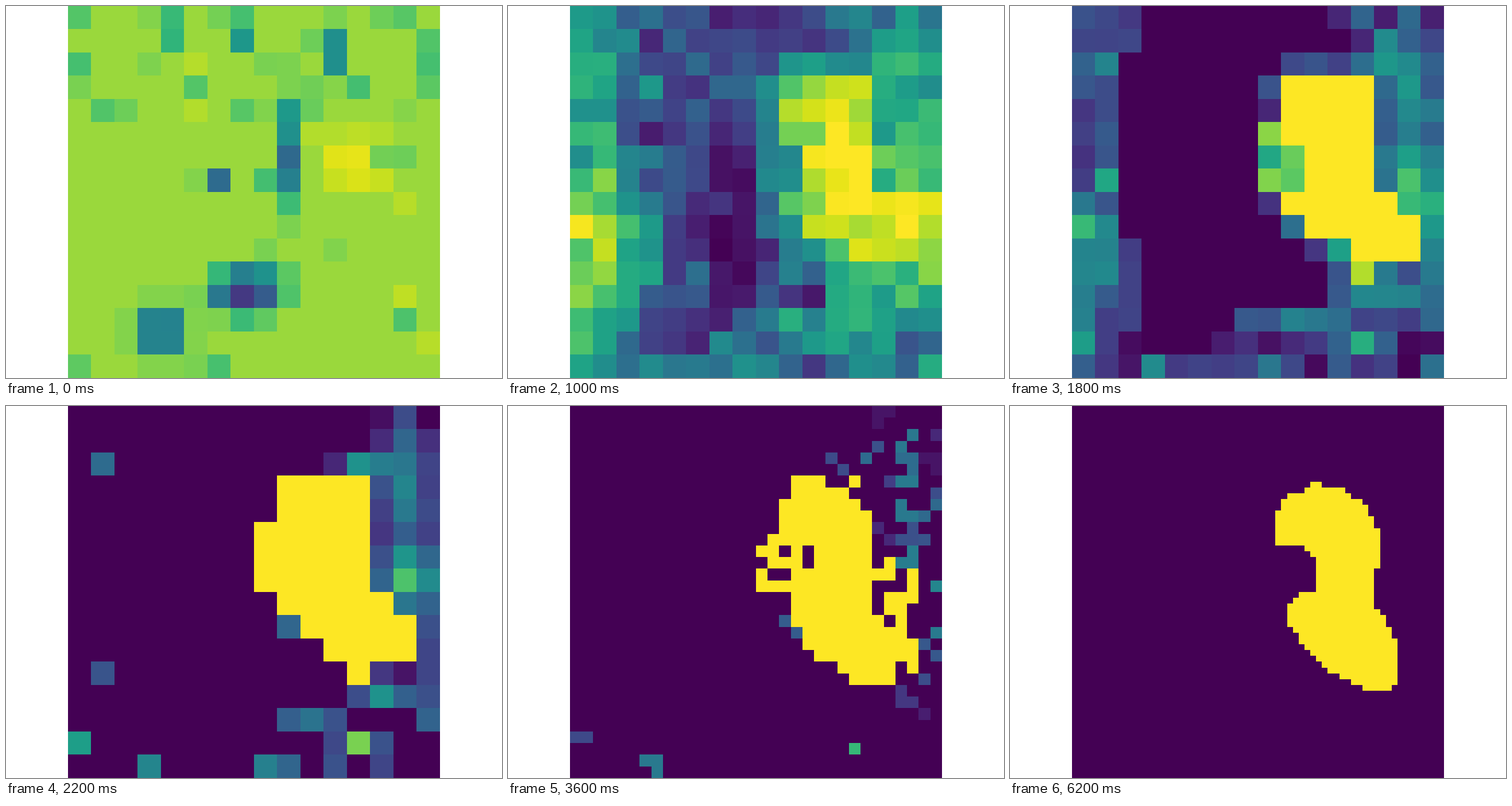
Recreate the animation shown at these times as a matplotlib script. Size 864 px wide and 648 px high, loop 6400 ms.

```python
import numpy as np
import matplotlib.pyplot as plt
from matplotlib.animation import FuncAnimation
from matplotlib.path import Path

FRAMES, INTERVAL = 32, 200
SPLIT_32, SPLIT_64, SETTLED = 16, 20, 23   # frames where the mesh refines and settles
START = 0.85

rng = np.random.default_rng(11)
ROWS, COLS = np.mgrid[0:16, 0:16]


def refine(grid, k):
    return np.kron(grid, np.ones((k, k)))


def hills(*bumps):
    """Sum of soft hills (x, y, x radius, y radius, height) on the coarse mesh."""
    return sum(h * np.exp(-((COLS - x) / rx) ** 2 - ((ROWS - y) / ry) ** 2)
               for x, y, rx, ry, h in bumps)


def grain(grid, amount):
    return np.clip(grid + rng.normal(0, amount, grid.shape), 0, 1)


def inside(corners, size):
    """Cells of a square mesh whose centre lies in the polygon."""
    y, x = np.mgrid[0:size, 0:size] + 0.5
    centres = np.column_stack([x.ravel(), y.ravel()])
    return Path(corners).contains_points(centres).reshape(size, size)


def sprouting():
    pull = hills((7.3, 11.7, 1.4, 0.9, -0.8), (3.5, 13.5, 0.9, 0.9, -0.75),
                 (9, 6, 0.6, 2, -0.45), (11, 1.5, 0.6, 1, -0.45),
                 (7, 1, 0.6, 0.6, -0.32), (6, 7, 0.5, 0.5, -0.5),
                 (4, 0.5, 0.7, 1, -0.25), (12, 6.3, 1.7, 1.4, 0.12))
    chance = np.where((ROWS < 7) | (COLS > 13), 0.3, 0.12)
    touched = rng.random(pull.shape) < chance
    pull = pull + touched * rng.uniform(-0.15, 0.06, pull.shape)
    return np.clip(START + np.where(np.abs(pull) > 0.03, pull, 0), 0, 1)


def sorting():
    grid = 0.68 + hills(
        (6.5, 10, 2, 4, -0.6), (6.2, 5, 3.5, 2.5, -0.27), (8, 0.3, 4.5, 1.2, -0.42),
        (11.5, 5.7, 1.7, 2.6, 0.42), (14, 9, 3, 3, 0.3), (1.2, 9.5, 2.3, 3.2, 0.28),
        (1.8, 0.6, 0.9, 0.9, -0.3), (4, 14, 2, 1.5, -0.35),
        (9.8, 12.2, 1.5, 0.7, -0.6), (10.5, 14.8, 1.5, 0.8, -0.35))
    return grain(grid, 0.1)


def forming():
    grid = grain(0.43 + hills(
        (0.3, 10, 1.6, 3.5, 0.4), (0, 4.5, 0.7, 1.2, 0.2), (14, 8.5, 2, 3, 0.35),
        (14.5, 14, 1.3, 1.2, -0.3), (13, 0, 2.5, 0.8, -0.2),
        (2.5, 14, 0.8, 2, -0.3), (9.5, 15, 1.5, 0.7, -0.4)), 0.11)
    grid[inside([(3, 0), (11, 0), (12, 2), (9, 2), (8, 4), (8, 9), (11, 11), (11, 13),
                 (7, 13), (6, 15), (3, 15), (3, 11), (2, 8), (2, 4)], 16)] = 0
    grid[inside([(10, 3), (13, 3), (13, 8), (15, 8), (15, 11), (13, 11), (10, 9.8),
                 (9, 9), (9, 8), (10, 8), (10, 6), (9, 6), (9, 4)], 16)] = 1
    return grid


def leftovers(strength):
    """Grey cells that linger right of the blob and along the bottom."""
    field = hills((13.7, 3, 1.3, 3.5, 0.45), (15, 9, 0.7, 5, 0.25),
                  (14, 7, 0.8, 1, 0.7), (12, 2, 1, 0.6, 0.35),
                  (13, 11.7, 1.2, 0.8, 0.55), (9.3, 9, 0.6, 0.6, 0.4),
                  (12, 14, 0.5, 0.5, 0.8), (0, 14, 0.4, 0.4, 0.4),
                  (3, 15, 0.4, 0.4, 0.33))
    return np.where(field > 0.1, grain(field * strength, 0.09), 0)


def clearing():
    grid = leftovers(1)
    bottom = (ROWS > 12) & (COLS > 6) & (COLS < 14) & (rng.random(grid.shape) < 0.4)
    sparse = (COLS < 6) & (rng.random(grid.shape) < 0.05)
    stray = (bottom | sparse) & (grid == 0)
    grid[stray] = rng.uniform(0.17, 0.45, stray.sum())
    grid[inside([(9, 3), (13, 3), (13, 8), (14, 8), (15, 10), (15, 11), (13, 11),
                 (13, 12), (12, 12), (9, 8), (8, 8), (8, 5), (9, 5)], 16)] = 1
    return grid


def coarse_result():
    grid = leftovers(0.9)
    grid[inside([(9, 3), (13, 3), (13, 6), (14, 6), (15, 8), (15, 12), (12.4, 12),
                 (10.2, 10.5), (8.7, 8), (8, 8), (8, 5), (9, 5)], 16)] = 1
    return grid


def fine_result():
    return inside([
        (41, 13), (43, 13), (43, 14), (47, 14), (47, 15), (50, 16.5), (52, 19.4),
        (52, 20.6), (53, 21), (53, 28), (52, 28), (52, 35), (52.5, 35), (55, 38.4),
        (55, 40), (56, 40), (56, 48), (55, 48), (55, 49), (50.4, 49), (45.7, 46),
        (45, 46), (39, 40.5), (39, 39), (37, 37.4), (37, 35), (39.4, 32), (42, 32),
        (42, 26), (40, 24), (35, 24), (35, 18), (36, 18), (36, 16), (40, 14.6)],
        64).astype(float)


def fine_start(shape, coarse):
    """The final shape with crumbs in its notch, grey edge cells and three specks."""
    grid = shape.copy()
    notch = np.zeros_like(grid, dtype=bool)
    notch[23:35, 35:42] = True
    crumbs = notch & (rng.random(grid.shape) < 0.18)
    grid[crumbs] = 1 - grid[crumbs]
    edge = (np.roll(shape, 1, 0) != shape) | (np.roll(shape, 1, 1) != shape)
    grey = edge & (rng.random(grid.shape) < 0.07)
    grid[grey] = rng.uniform(0.2, 0.95, grey.sum())
    for col, row in [(48, 2), (56, 51), (48, 59)]:
        grid[row, col] = coarse[row // 4, col // 4]
    return grid


KEY_FRAMES = [0, 3, 7, 11, 15]
KEYS = [sprouting(), sorting(), forming(), clearing(), coarse_result()]
FINE_B = fine_result()
FINE_A = fine_start(FINE_B, KEYS[-1])
MEDIUM = refine(FINE_A.reshape(32, 2, 32, 2).mean(axis=(1, 3)) > 0.5, 2)

pace = np.exp(rng.normal(0, 0.4, (16, 16)))
order_32 = refine(rng.random((32, 32)), 2)
order_64 = rng.random((64, 64))
switch = rng.integers(SETTLED + 1, FRAMES, (64, 64))


def coarse(n):
    k = min(np.searchsorted(KEY_FRAMES, n, side="right") - 1, len(KEYS) - 2)
    t = (n - KEY_FRAMES[k]) / (KEY_FRAMES[k + 1] - KEY_FRAMES[k])
    return refine(KEYS[k] + (KEYS[k + 1] - KEYS[k]) * t ** pace, 4)


def medium(n):
    return np.where(order_32 < (n - SPLIT_32 + 1) / 5, MEDIUM, refine(KEYS[-1], 4))


def density(n):
    if n < SPLIT_32:
        return coarse(n)
    if n < SPLIT_64:
        return medium(n)
    if n <= SETTLED:
        done = (n - SPLIT_64 + 1) / (SETTLED - SPLIT_64 + 1)
        return np.where(order_64 < done, FINE_A, medium(SPLIT_64 - 1))
    return np.where(switch <= n, FINE_B, FINE_A)


fig = plt.figure(figsize=(8.64, 6.48), dpi=100, facecolor="white")
ax = fig.add_axes([0.125, 0, 0.75, 1])
ax.axis("off")
image = ax.imshow(density(0), cmap="viridis", vmin=0, vmax=1,
                  interpolation="nearest", aspect="auto")


def update(n):
    image.set_data(density(n))
    return (image,)


anim = FuncAnimation(fig, update, frames=FRAMES, interval=INTERVAL,
                     repeat=True, repeat_delay=0)
plt.show()
```
